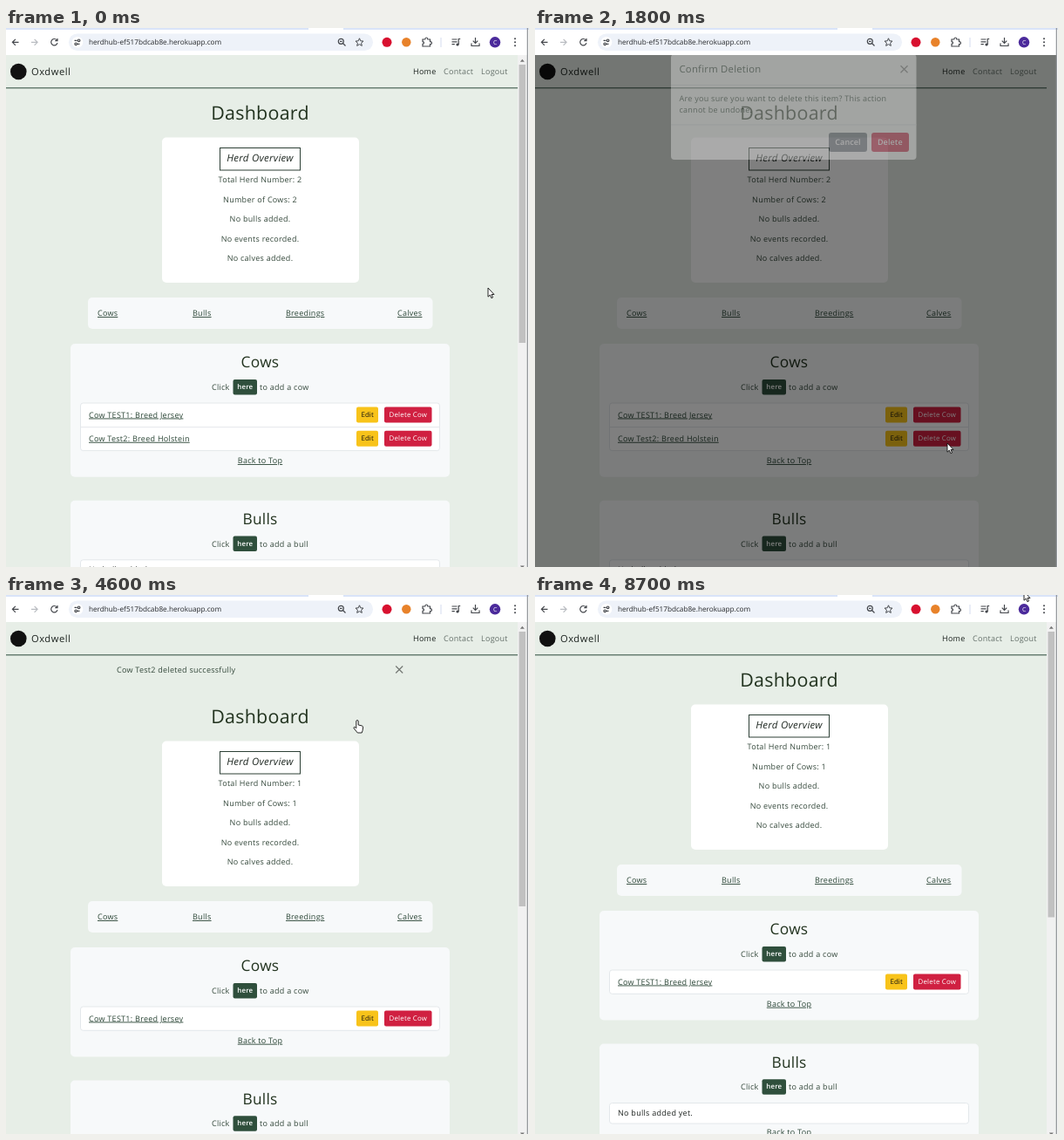
An HTML page for the animation above (8.8 s loop, 600 by 618 pixels).

```html
<!DOCTYPE html>
<html lang="en">
<head>
<meta charset="utf-8">
<title>Herd dashboard</title>
<style>
html, body { margin: 0; height: 100%; overflow: hidden; background: #fff; }
svg { display: block; width: 600px; height: 618px; }
text { font: 9px "Open Sans", "Noto Sans", sans-serif; letter-spacing: .27px; fill: #34483b; text-rendering: geometricPrecision; white-space: pre; }
.mid { text-anchor: middle; }
.link { text-decoration: underline; fill: #2b4636; }
.h1 { font-size: 21.4px; fill: #22331f; }
.h2 { font-size: 17.3px; fill: #22331f; }
.over { font-size: 11.5px; font-style: italic; fill: #222b25; }
.brand { font-size: 11.2px; font-weight: 500; letter-spacing: .5px; fill: #1d2420; }
.title { font-size: 11.25px; }
.active { font-weight: 500; fill: #1d2420; }
.muted { fill: #65706a; }
.dark { fill: #202522; }
.btn { font-size: 7.9px; font-weight: 500; letter-spacing: .2px; fill: #fff; }
.edit { font-size: 7.9px; letter-spacing: .1px; fill: #111; }
.big { font-weight: 600; letter-spacing: .1px; fill: #fff; }
.url { font-size: 8.2px; letter-spacing: 0; fill: #26282b; }
.icon { fill: none; stroke: #44474c; stroke-width: 1.2; }
.x { fill: none; stroke: #000; stroke-width: 1.2; }
.cur { fill: #fff; stroke: #111; stroke-width: .9; stroke-linejoin: round; }
</style>
</head>
<body>
<svg id="stage" viewBox="0 0 600 618"></svg>
<script>
const text = (x, y, s, cls = '', id = '') => `<text id="${id}" x="${x}" y="${y}" class="${cls}">${s}</text>`;
const mid = (y, s, cls = '', id) => text(291.5, y, s, 'mid ' + cls, id);
const box = (x, y, w, h, fill, r = 0, more = '') =>
  `<rect x="${x}" y="${y}" width="${w}" height="${h}" rx="${r}" fill="${fill}" ${more}/>`;
const dot = (x, y, r, fill) => `<circle cx="${x}" cy="${y}" r="${r}" fill="${fill}"/>`;
const path = (d, cls = 'icon', more = '') => `<path d="${d}" class="${cls}" ${more}/>`;
const cross = (x, y, r, cls, more) => path(`M${x - r} ${y - r}l${2 * r} ${2 * r}m0 ${-2 * r}l${-2 * r} ${2 * r}`, cls, more);
const group = (id, s) => `<g id="${id}">${s}</g>`;

const GREEN = '#2f4f3c', RED = '#d02041', DARK_RED = '#ab1b3a', CARD = '#f7f9fa';
const ROW = 27.3, ALERT = 42;
const LINE = 'stroke="#dee2e6" stroke-width=".8"';

const adder = (y, what) =>
  text(236, y, 'Click') + box(260.5, y - 12, 27.5, 17.5, GREEN, 2) +
  text(274.3, y - 1, 'here', 'btn mid" style="font-weight:600') + text(291, y, `to add a ${what}`);

const cowRow = (y, label, id) =>
  text(95, y, label, 'link') +
  box(402, y - 12, 25, 18, '#f8c31a', 2) + text(414.6, y - 1, 'Edit', 'edit mid') +
  box(434, y - 12, 54.5, 18, RED, 2, `id="${id}"`) + text(461.3, y - 1, 'Delete Cow', 'btn mid');

const navbar =
  dot(14.3, 50, 9.3, '#111') + text(29, 53.5, 'Oxdwell', 'brand') +
  text(467, 53, 'Home', 'active') + text(502, 53, 'Contact', 'muted') + text(545, 53, 'Logout', 'muted') +
  box(0, 68.3, 587, 1, '#2c4a3b');

const alertBar = group('alert',
  text(127, 88.5, 'Cow Test2 deleted successfully') +
  box(437.2, 69.2, 29.5, 33.5, 'none', 3, 'id="ring" stroke="#0d6efd" stroke-opacity=".25" stroke-width="2.2"') +
  cross(451.2, 85.5, 4, 'x', 'id="close"'));

const overview =
  mid(105, 'Dashboard', 'h1') + box(179, 125.5, 226, 166.5, '#fff', 5) +
  box(245.5, 137.5, 92, 25.5, 'none', 0, 'stroke="#2c3f35"') + mid(153, 'Herd Overview', 'over') +
  mid(177, '', '', 'total') + mid(199.6, '', '', 'cows') +
  ['No bulls added.', 'No events recorded.', 'No calves added.'].map((s, i) => mid(222.2 + i * 22.6, s)).join('') +
  box(94, 309, 395.5, 36, CARD, 5) +
  [[105, 'Cows'], [214, 'Bulls'], [321, 'Breedings'], [449, 'Calves']].map(([x, s]) => text(x, 330, s, 'link')).join('');

const cows =
  box(74, 362, 435, 152.8, CARD, 5, 'id="cowCard"') + mid(389, 'Cows', 'h2') + adder(415, 'cow') +
  box(85.5, 430, 412, 2 * ROW, '#fff', 3, 'id="cowList" ' + LINE) +
  cowRow(446.5, 'Cow TEST1: Breed Jersey', 'del1') +
  group('row2', box(86, 457.3, 411, .8, '#dee2e6') + cowRow(446.5 + ROW, 'Cow Test2: Breed Holstein', 'del2'));

const tail = group('tail',
  mid(499, 'Back to Top', 'link') + box(74, 541.8, 435, 152, CARD, 5) + mid(569, 'Bulls', 'h2') + adder(594.5, 'bull') +
  box(85.5, 609.8, 412, 23.5, '#fff', 3, LINE) + text(95, 624.3, 'No bulls added yet.', 'dark') +
  mid(646.5, 'Back to Top', 'link'));

const scrollbar = group('bar',
  box(587, 31, 10.5, 587, '#f1f1f1') + box(588.5, 42, 7.5, 319, '#c1c1c1', 0, 'id="thumb"') +
  '<path d="M589.8 38.8l2.5-3 2.5 3zM589.8 616.5l2.5 3 2.5-3z" fill="#777"/>');

const modal = group('modal',
  box(156, 48, 281.5, 121, '#fff', 4) + text(165.5, 69, 'Confirm Deletion', 'title') +
  cross(423.5, 65.3, 4, 'x', 'opacity=".5"') +
  box(156, 83, 281.5, .8, '#dee2e6') + box(156, 128.6, 281.5, .8, '#dee2e6') +
  text(165.5, 102, 'Are you sure you want to delete this item? This action') + text(165.5, 115.5, 'cannot be undone.') +
  box(337, 138, 44, 22, '#6c757d', 3) + text(359, 152, 'Cancel', 'big mid') +
  box(386, 138, 43, 22, RED, 3, 'id="confirm"') + text(407.3, 152, 'Delete', 'big mid'));

const toolbar =
  box(0, 0, 600, 31, '#fff') + box(0, 0, 347, 2, '#d9e4f8') + box(387, 0, 213, 2, '#d9e4f8') +
  path('M14.5 16.3H7.5m3.4-3.5L7.4 16.3l3.5 3.5') +
  path('M29 16.3h7m-3.4-3.5l3.5 3.5l-3.5 3.5', 'icon', 'style="stroke:#b9bcc1"') +
  group('reload', path('M58.4 14A3.7 3.7 0 1 0 59 17.2M59 12v2.6h-2.7')) + group('stop', cross(55.2, 16.3, 3.3, 'icon')) +
  box(72, 6.5, 349, 19.5, '#eef2f9', 9.7) + dot(82, 16.3, 6.3, '#fff') +
  path('M78.5 14.3h3m3 4h-3') + '<circle cx="83.6" cy="14.3" r="1.3" class="icon"/><circle cx="80.2" cy="18.3" r="1.3" class="icon"/>' +
  text(95, 19.3, 'herdhub-ef517bdcab8e.herokuapp.com', 'url') +
  '<circle cx="384.3" cy="15.3" r="3" class="icon"/>' + path('M386.5 17.5l3 3M383 15.3h2.6') +
  path('M405.5 11.8l1.3 3 3.2.3-2.4 2.1.7 3.2-2.8-1.7-2.8 1.7.7-3.2-2.4-2.1 3.2-.3z', 'icon', 'style="stroke-width:1"') +
  dot(437, 16.3, 5.5, '#d8102f') + dot(459.3, 16.3, 5.2, '#e8822a') +
  path('M478 13h2.8q0-2 1.5-2t1.5 2h2.7v2.7q2 0 2 1.5t-2 1.5v2.3H478v-2.6q1.5-.2 1.5-1.4t-1.5-1.3z') +
  box(498.5, 11, 1, 11, '#d3dcf0') +
  path('M511.5 13h6m-6 2.8h6m-6 2.8h3.3m4.4.3V12.5h2') + dot(518, 19, 1.6, '#44474c') +
  path('M538.5 11v6.3m-2.8-2.7l2.8 2.8l2.8-2.8M534 17.5v3h9v-3') +
  dot(561, 16.3, 6.2, '#4b2a9b') + text(561.1, 19, 'C', 'mid" style="fill:#fff;font-size:7px;letter-spacing:0') +
  [12.3, 16.3, 20.3].map(y => dot(584, y, 1, '#44474c')).join('');

document.getElementById('stage').innerHTML =
  box(0, 31, 598, 587, '#e7eee7') + navbar + alertBar +
  group('main', overview + cows + tail) + scrollbar +
  box(0, 31, 598, 587, '#000', 0, 'id="dim"') + modal + toolbar + box(597.7, 0, 1.2, 618, '#8c9094') +
  group('cursor',
    path('M0 0v10.2l2.3-2.1 1.6 3.6 1.6-.7-1.5-3.5h3z', 'cur', 'id="arrow"') +
    path('M-1.2 8V.8a1.2 1.2 0 0 1 2.4 0V5l4 .9q1.5.4 1.4 2l-.5 3.4-.9 2.7H.3L-3.8 9q-.7-1.4.4-1.6 1 0 2.2 1.3z', 'cur', 'id="hand"'));

const el = id => document.getElementById(id);
const set = (id, name, value) => el(id).setAttribute(name, value);
const show = (id, on) => set(id, 'visibility', on ? 'visible' : 'hidden');
const clamp = v => Math.max(0, Math.min(1, v));

// Pointer tip: time, x, y
const TRACK = [[0, 553, 298], [400, 520, 380], [900, 520, 380], [1400, 473, 476], [1900, 473, 476],
  [2500, 407, 162], [2700, 403, 144], [6100, 403, 144], [6200, 449, 96], [6500, 451, 89], [7900, 451, 89], [8700, 561, -4]];

function pointer(t) {
  const i = TRACK.findIndex(k => k[0] > t);
  if (i < 0) return TRACK.at(-1).slice(1);
  const a = TRACK[i - 1], b = TRACK[i], p = (t - a[0]) / (b[0] - a[0]);
  return [1, 2].map(n => a[n] + (b[n] - a[n]) * p);
}

function draw(t) {
  const within = (a, b) => t >= a && t < b;
  const deleted = t >= 4600, alerting = within(4600, 8100), herd = deleted ? 1 : 2;

  el('total').textContent = 'Total Herd Number: ' + herd;
  el('cows').textContent = 'Number of Cows: ' + herd;
  show('row2', !deleted);
  set('cowList', 'height', ROW * herd);
  set('cowCard', 'height', 98.2 + ROW * herd);
  set('tail', 'transform', `translate(0 ${deleted ? -ROW : 0})`);
  set('main', 'transform', `translate(0 ${alerting ? ALERT : 0})`);
  set('thumb', 'height', alerting ? 315 : deleted ? 327.5 : 319);
  set('del2', 'fill', within(1400, 1800) ? DARK_RED : RED);

  set('alert', 'opacity', alerting ? 1 - clamp((t - 7950) / 150) : 0);
  set('close', 'opacity', t >= 7000 ? 1 : t >= 6200 ? .75 : .5);
  show('ring', t >= 7000);

  const p = clamp((t - 1750) / 300);
  set('dim', 'opacity', deleted ? 0 : .5 * clamp((t - 1600) / 150));
  set('modal', 'opacity', deleted ? 0 : clamp((t - 1750) / 150));
  set('modal', 'transform', `translate(0 ${-26 * (1 - p) ** 2})`);
  set('confirm', 'fill', t >= 2600 ? DARK_RED : RED);
  show('bar', !within(1700, 4600));

  const loading = within(4100, 4600);
  show('stop', loading);
  show('reload', !loading);

  const hand = within(1400, 1800) || within(2600, 4700) || within(6200, 8100);
  show('hand', hand);
  show('arrow', !hand);
  set('cursor', 'transform', `translate(${pointer(t)})`);
}

const start = performance.now();
function tick(now) {
  const t = Math.max(0, now - start) % 8800;
  draw(Math.floor((t + 5) / 100) * 100 % 8800);
  requestAnimationFrame(tick);
}
draw(0);
requestAnimationFrame(tick);
</script>
</body>
</html>
```
